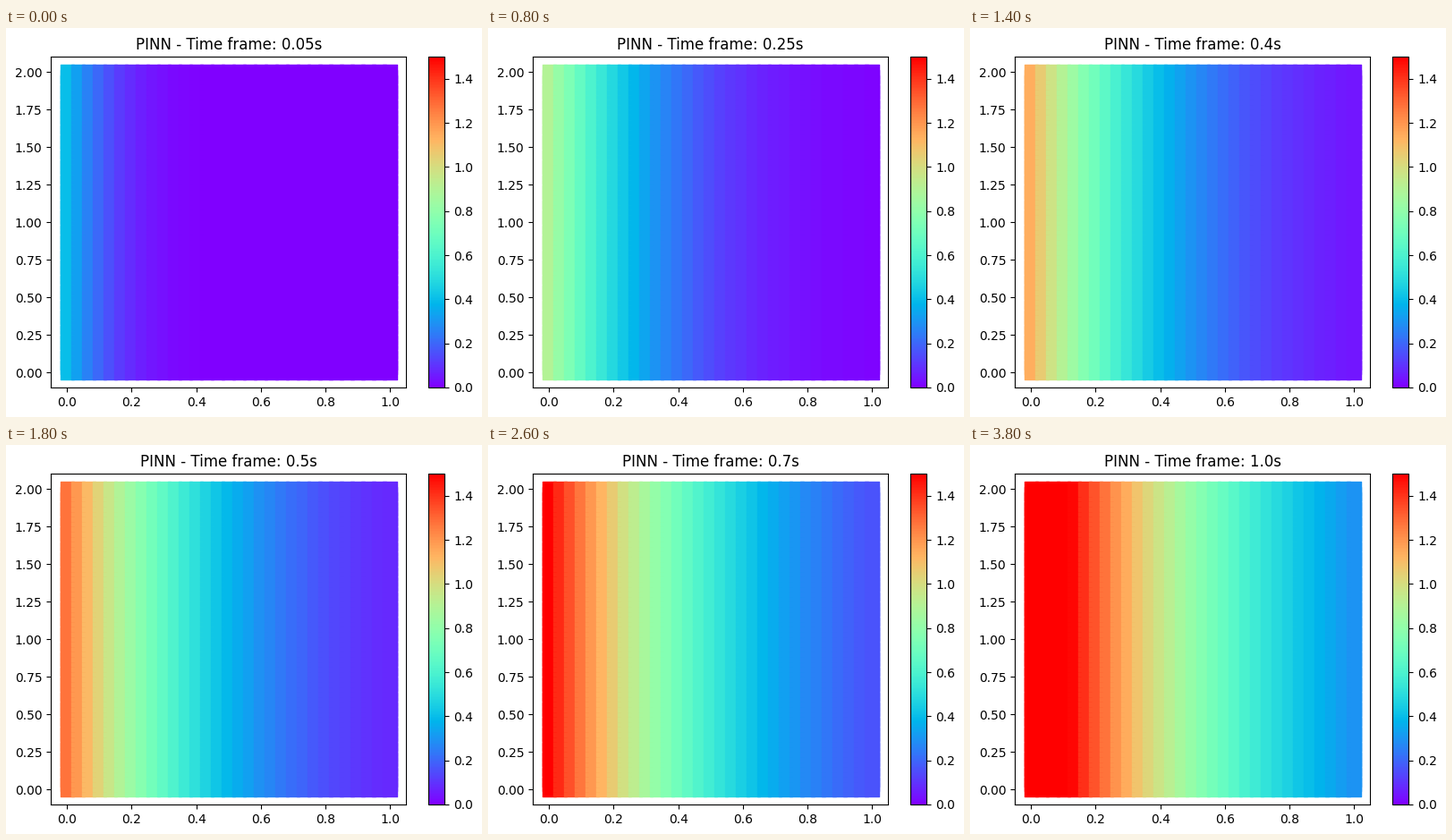
A matplotlib script that plays this animation: 532x435 px, repeating every 4 s.

```python
import math

import matplotlib.pyplot as plt
import numpy as np
from matplotlib.animation import FuncAnimation

W, H, DPI = 532, 435, 100
EPS = 1e-6  # keeps the pixel size from being truncated
FRAMES, INTERVAL = 20, 200
NX, NY = 31, 61
DIFFUSIVITY = 0.4
SURFACE_RATE = 1.8  # surface value at t = 1
VMAX = 1.5

plt.rcParams["font.family"] = "DejaVu Sans"


def heat(x, t):
    """Half-space heated by a constant flux at x = 0."""
    eta = x / (2 * math.sqrt(DIFFUSIVITY * t))
    erfc = np.array([math.erfc(e) for e in eta])
    profile = np.exp(-eta**2) - math.sqrt(math.pi) * eta * erfc
    return SURFACE_RATE * math.sqrt(t) * profile


def add_axes(left, bottom, width, height):
    return fig.add_axes([left / W, bottom / H, width / W, height / H])


fig = plt.figure(figsize=(W / DPI + EPS, H / DPI + EPS), dpi=DPI)
ax = add_axes(50.3, 33.1, 396.8, 369.6)
cax = add_axes(471.9, 33.1, 18.48, 369.6)

xs = np.linspace(0, 1, NX)
gx, gy = np.meshgrid(xs, np.linspace(0, 2, NY))
points = ax.scatter(gx, gy, c=np.zeros(gx.size), s=120, marker="s",
                    cmap="rainbow", vmin=0, vmax=VMAX)
ax.set_xlim(-0.05, 1.05)
ax.set_ylim(-0.1, 2.1)
fig.colorbar(points, cax=cax)
title = ax.set_title("")


def update(i):
    t = round(0.05 * (i + 1), 2)
    points.set_array(np.tile(heat(xs, t), NY))
    title.set_text(f"PINN - Time frame: {t}s")
    return points, title


anim = FuncAnimation(fig, update, frames=FRAMES, interval=INTERVAL,
                     repeat=True, repeat_delay=0, blit=False)
plt.show()
```
